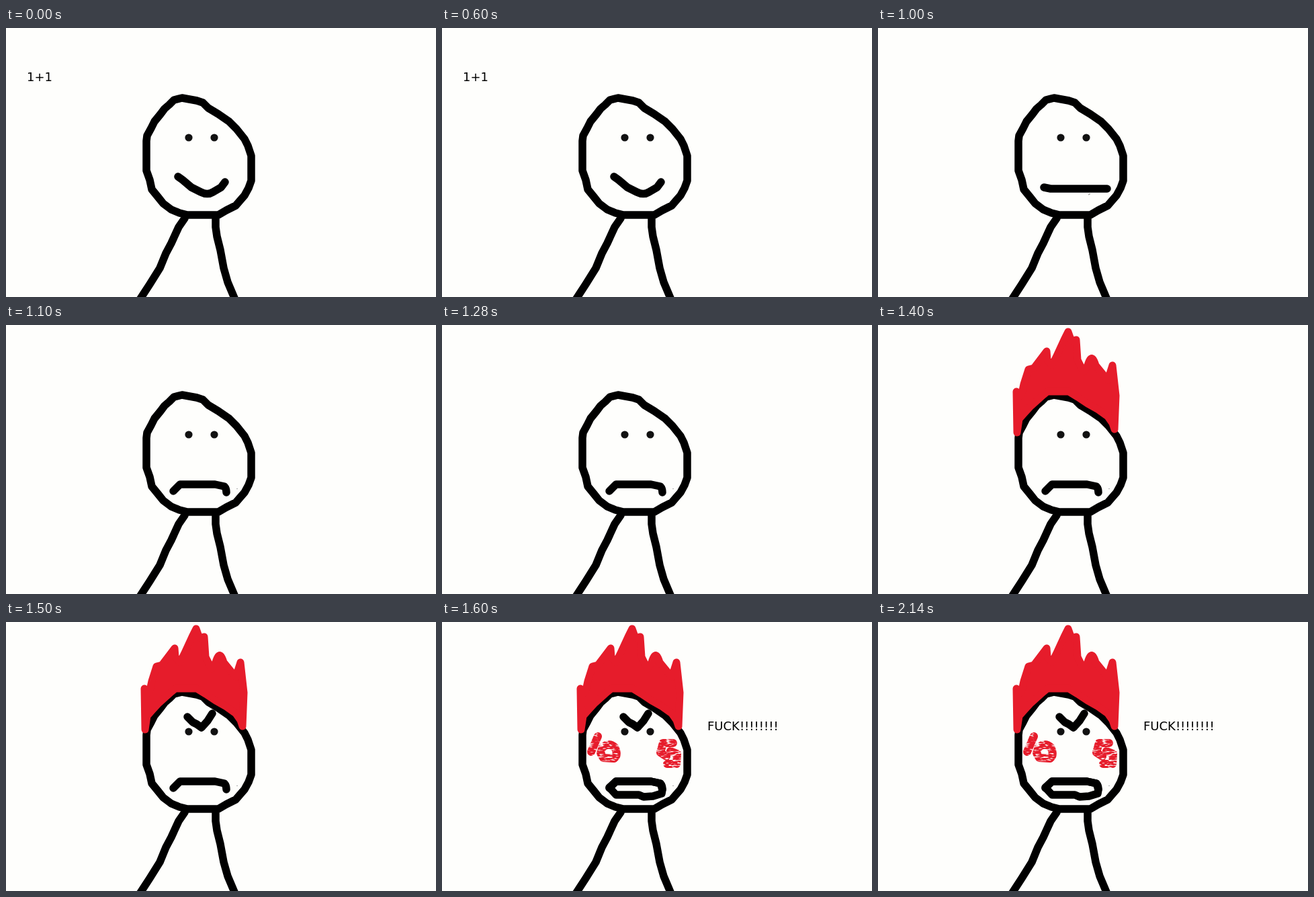
Animation, 640 px wide and 400 px high, one loop 2.5 s. Source, as an HTML page without scripts:

```html
<!DOCTYPE html>
<html lang="en">
<head>
<meta charset="utf-8">
<title>Losing it over a sum</title>
<style>
  html, body { margin: 0; width: 100%; height: 100%; overflow: hidden; background: #fefefc; }
  svg { display: block; width: 100vw; height: 100vh; }
  .ink { fill: none; stroke: #000; stroke-width: 11.5; stroke-linecap: round; stroke-linejoin: round; }
  .hair { fill: #e61c2b; stroke: #e61c2b; stroke-width: 11; stroke-linejoin: round; }
  .blush { fill: none; stroke: #e61c2b; stroke-width: 12; stroke-linecap: round; stroke-linejoin: round; }
  text { font: 18px "DejaVu Sans", sans-serif; fill: #000; }

  /* Each pose switches hard, with no easing */
  .calm, .flat, .sad, .fire, .brow, .rage { animation: 2.5s step-end infinite; }
  .calm { animation-name: calm; }
  .flat { animation-name: flat; }
  .sad  { animation-name: sad; }
  .fire { animation-name: fire; }
  .brow { animation-name: brow; }
  .rage { animation-name: rage; }
  @keyframes calm { 0% { opacity: 1 } 40%, 100% { opacity: 0 } }
  @keyframes flat { 0% { opacity: 0 } 40% { opacity: 1 } 44%, 100% { opacity: 0 } }
  @keyframes sad  { 0% { opacity: 0 } 44%, 100% { opacity: 1 } }
  @keyframes fire { 0% { opacity: 0 } 56%, 100% { opacity: 1 } }
  @keyframes brow { 0% { opacity: 0 } 60%, 100% { opacity: 1 } }
  @keyframes rage { 0% { opacity: 0 } 64%, 100% { opacity: 1 } }
</style>
</head>
<body>
<svg viewBox="0 0 640 400">
  <defs>
    <!-- Dry brush: streaky, slightly soft paint -->
    <filter id="dry" filterUnits="userSpaceOnUse" x="205" y="155" width="160" height="70" color-interpolation-filters="sRGB">
      <feTurbulence type="fractalNoise" baseFrequency=".12 .4" numOctaves="2" seed="4"/>
      <feColorMatrix values="0 0 0 0 0  0 0 0 0 0  0 0 0 0 0  0 0 0 5 -1.4" result="streaks"/>
      <feGaussianBlur in="SourceGraphic" stdDeviation=".7"/>
      <feComposite operator="in" in2="streaks"/>
    </filter>
  </defs>
  <rect width="640" height="400" fill="#fefefc"/>

  <g class="ink">
    <path d="M262 104 L250 107 243 114 236 120 230 128 221 139 216 149 210 160 209 168
             V212 L214 226 217 240 226 251 234 261 246 270 258 275 270 278
             H316 L328 271 342 264 348 257 355 249 361 238 365 227
             V190 L360 175 355 165 343 150 332 139 316 128 301 119 293 111 284 108Z"/>
    <path d="M266 283 L257 296 246 320 238 335 229 357 214 381 199 404"/>
    <path d="M312 283 V296 L314 310 319 330 324 357 330 378 341 404"/>
  </g>
  <g fill="#111">
    <circle cx="272" cy="163" r="5.6"/>
    <circle cx="310" cy="163" r="5.6"/>
  </g>

  <g class="calm">
    <path class="ink" d="M256 221 L263 226 276 237 290 244 Q300 249 308 244 L320 237 326 229"/>
    <text x="31" y="79">1+1</text>
  </g>

  <g class="flat">
    <path class="ink" d="M247 237 L257 239 H341"/>
    <path d="M313 248 l3 -1.500" stroke="#777"/>
  </g>

  <g class="sad">
    <path class="ink" d="M249 247 L259 237 H311 L325 240 Q328 243 328 249"/>
    <circle cx="344" cy="243.500" r=".8" fill="#999"/>
  </g>

  <path class="fire hair" d="M206 99 L207 160 210 140 217 132 226 122 236 113 246 104 252 99
    H284 L297 107 312 117 328 126 342 136 349 146 352 155 354 105 349 60
    342 82 324 60 Q318 39 312 60 L306 70 297 52 295 22 288 24 283 10 277 22 265 48
    259 60 252 52 251 39 232 64 224 66 217 88 214 102 211 106Z"/>

  <path class="brow ink" d="M270 141 L278 149 284 152 291 157 300 147 307 136"/>

  <g class="rage">
    <path class="ink" d="M249 246 L259 237 H311 L325 240 328 249 327 255 314 259 300 260 293 257 H259Z"/>
    <g class="blush" filter="url(#dry)">
      <path d="M232 170 L222 193"/>
      <path d="M239 186 Q249 179 257 186 Q263 198 256 203 L240 202 236 195Z"/>
      <path d="M344 180 L329 180 325 194 334 200 M340 192 L350 196 349 211 H335"/>
    </g>
    <text x="395" y="161">FUCK!!!!!!!!</text>
  </g>
</svg>
</body>
</html>
```
